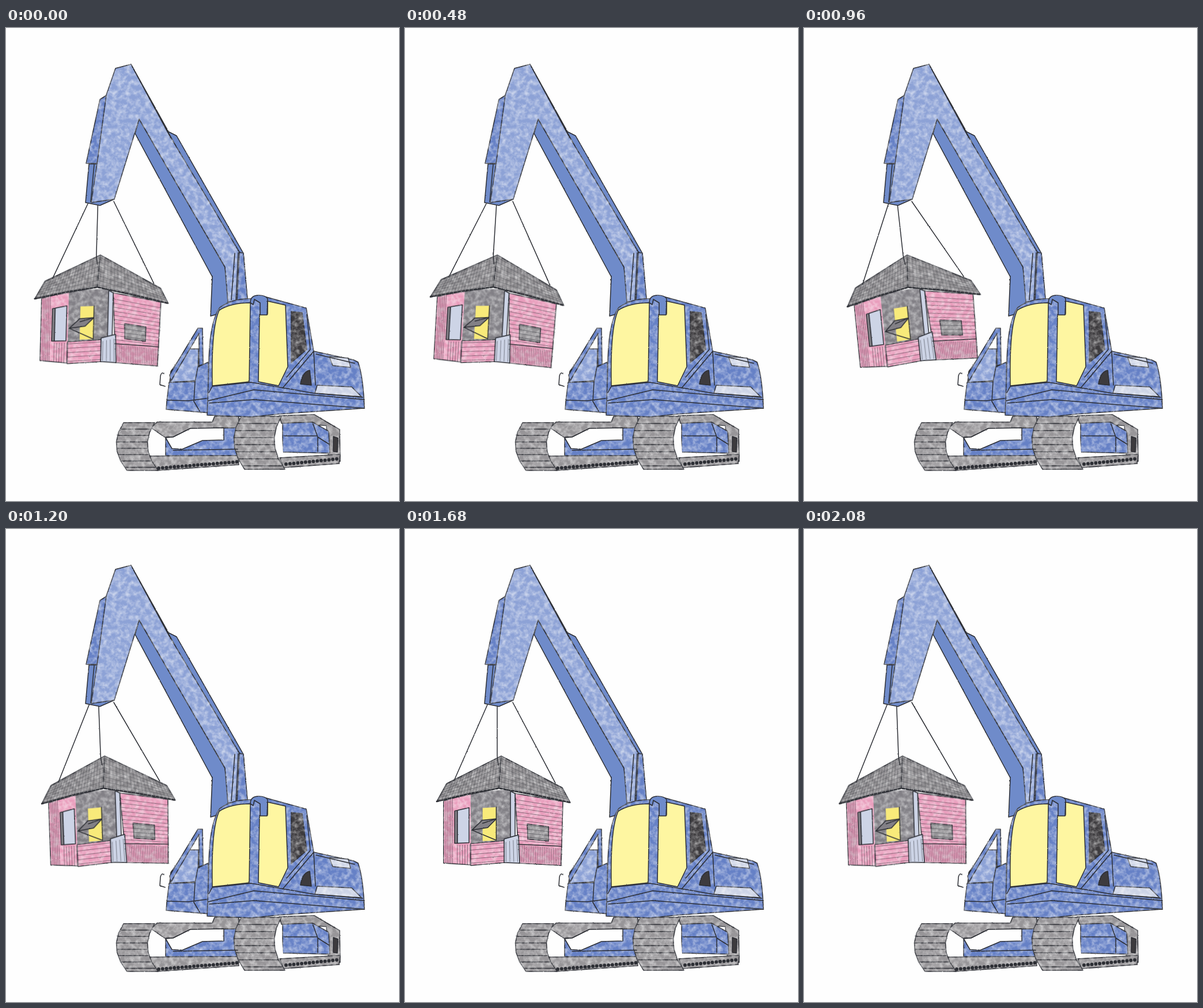
Write an HTML page that moves like this. It is 682x821 px and loops after 2.16 s.

```html
<!DOCTYPE html>
<html lang="en">
<head>
<meta charset="utf-8">
<title>Excavator carrying a house</title>
<style>
  html, body { margin: 0; width: 100%; height: 100%; overflow: hidden; background: #fefefe; }
  svg { display: block; width: 100%; height: 100%; }
  path { stroke: #2c2e34; stroke-width: 1.5; stroke-linejoin: round; stroke-linecap: round; }
  .line { fill: none; }
  .thin { fill: none; stroke-width: .8; stroke-opacity: .65; }
  .tile { fill: none; stroke-width: .8; stroke-opacity: .42; }
  .eave { fill: none; stroke-width: 2.4; stroke-dasharray: 4 3; }
  .dots { fill: none; stroke-width: 6; stroke-dasharray: 0 6.8; }
  .bare { stroke: none; }
  .light { fill: #8da2d6; }
  .blue { fill: #6681c6; }
  .deep { fill: #6f8bca; }
  .panel { fill: #cdd4e6; }
  .pane { fill: #fef6a1; }
  .lamp { fill: #f8ea7a; stroke: none; }
  .dark { fill: #3d3b3e; }
  .grey { fill: #979598; }
  .roof { fill: #908e91; }
  .porch { fill: #828086; }
  .pink { fill: #e99dbc; }
  .white { fill: #fefefe; }
  .crayon { filter: url(#crayon); }
  .pencil { filter: url(#pencil); }
</style>
</head>
<body>
<svg viewBox="0 0 682 821" preserveAspectRatio="none">
  <filter id="pencil" color-interpolation-filters="sRGB">
    <feTurbulence type="fractalNoise" baseFrequency=".5" numOctaves="2" seed="4"/>
    <feDisplacementMap in="SourceGraphic" scale="2" xChannelSelector="R" yChannelSelector="G"/>
  </filter>
  <filter id="crayon" color-interpolation-filters="sRGB">
    <feTurbulence type="fractalNoise" baseFrequency=".12" numOctaves="4" seed="7"/>
    <feColorMatrix values="0 0 0 0 1  0 0 0 0 1  0 0 0 0 1  1.1 0 0 0 -.4" result="chalk"/>
    <feTurbulence type="fractalNoise" baseFrequency=".5" numOctaves="2" seed="4"/>
    <feDisplacementMap in="SourceGraphic" scale="2" xChannelSelector="R" yChannelSelector="G" result="rough"/>
    <feComposite in="chalk" in2="rough" operator="in" result="grain"/>
    <feMerge><feMergeNode in="rough"/><feMergeNode in="grain"/></feMerge>
  </filter>
</svg>
<script>
  const svg = document.querySelector('svg');
  const mix = (a, b, t) => a + (b - a) * t;

  function add(parent, tag, className, d) {
    const node = document.createElementNS(svg.namespaceURI, tag);
    node.setAttribute('class', className);
    if (d) node.setAttribute('d', d);
    return parent.appendChild(node);
  }
  const layer = (filter, parent = svg) => add(parent, 'g', filter);

  // A face maps (u, v) in the unit square onto a quad given as "TL TR BR BL"
  function face(corners) {
    const [ax, ay, bx, by, cx, cy, dx, dy] = corners.split(' ').map(Number);
    return (u, v) => [mix(mix(ax, bx, u), mix(dx, cx, u), v), mix(mix(ay, by, u), mix(dy, cy, u), v)];
  }
  const line = (...points) => 'M' + points.join('L');
  const area = (at, u0 = 0, v0 = 0, u1 = 1, v1 = 1) =>
    line(at(u0, v0), at(u1, v0), at(u1, v1), at(u0, v1)) + 'Z';
  const repeat = (count, stroke) =>
    Array.from({ length: count }, (_, i) => stroke((i + .5) / count)).join('');
  const rows = (at, count, u0 = 0, v0 = 0, u1 = 1, v1 = 1) =>
    repeat(count, t => line(at(u0, mix(v0, v1, t)), at(u1, mix(v0, v1, t))));
  const columns = (at, count, u0 = 0, v0 = 0, u1 = 1, v1 = 1) =>
    repeat(count, t => line(at(mix(u0, u1, t), v0), at(mix(u0, u1, t), v1)));

  function drawHouse() {
    const house = add(svg, 'g', 'house');
    const side = face('67 472 115 458 115 583 67 580');
    const porch = face('114 456 188 452 188 540 114 545');
    const rail = face('114 546 172 541 173 579 114 584');
    const front = face('191 459 274 473 271 584 198 580');
    const post = face('183 455 191 459 191 533 183 535');
    const gate = face('172 538 197 531 199 580 172 579');
    const roofLeft = face('72 442 167 394 163 450 55 473');
    const roofRight = face('167 394 273 449 287 475 163 450');

    const fills = layer('crayon', house);
    add(fills, 'path', 'pink', area(side));
    add(fills, 'path', 'porch bare', area(porch));
    add(fills, 'path', 'pink', area(rail));
    add(fills, 'path', 'pink', area(front));
    add(fills, 'path', 'grey', area(front, .23, .42, .7, .64));
    add(fills, 'path', 'roof', area(roofLeft));
    add(fills, 'path', 'roof', area(roofRight));

    const details = layer('pencil', house);
    add(details, 'path', 'porch', area(side, .4, .2, .5, .69));
    add(details, 'path', 'panel', area(side, .5, .2, .92, .69));
    add(details, 'path', 'panel', area(post));
    add(details, 'path', 'panel', area(gate));
    add(details, 'path', 'lamp', area(porch, .28, .33, .61, .98));
    add(details, 'path', 'porch', line(porch(.03, .75), porch(.27, .57), porch(.6, .56), porch(.4, .72)) + 'Z');
    add(details, 'path', 'line', line(porch(.03, .75), porch(.6, .98), porch(.6, .33)) +
      line(porch(.28, .63), porch(.6, .56)) + line(front(0, .73), front(1, .7)));
    add(details, 'path', 'thin',
      rows(front, 11, 0, .06, 1, .7) + columns(front, 24, 0, .74, 1, .98) +
      columns(side, 5, .05, 0, .35, 1) + columns(side, 6, .45, .72, 1, 1) +
      rows(rail, 5) + columns(gate, 4, 0, .15, 1, .95));
    add(details, 'path', 'tile',
      rows(roofLeft, 7) + columns(roofLeft, 20) + rows(roofRight, 7) + columns(roofRight, 19));
    add(details, 'path', 'eave', line(roofLeft(0, 1), roofLeft(.5, .96), roofLeft(1, 1), roofRight(.5, .97), roofRight(1, 1)));
    return house;
  }

  function drawArm() {
    const back = layer('pencil');
    add(back, 'path', 'deep', 'M231 158L224 183 358 432 355 500 390 490 380 415Z');
    add(back, 'path', 'deep', 'M217 63L282 180 296 187 412 391 419 472 398 478 397 392Z');
    add(back, 'path', 'deep', 'M144 236L138 303 163 308 188 297 162 236Z');
    const front = layer('crayon');
    add(front, 'path', 'light', 'M190 70L217 63 283 185 405 389 401 475 385 475 380 415 231 158 188 297 148 303 158 235 173 119Z');
    add(front, 'path', 'blue', 'M163 124L174 117 158 235 139 235Z');
    add(front, 'path', 'blue', 'M405 389L412 391 419 470 401 474Z');
    add(layer('pencil'), 'path', 'line', 'M219 67L284 187M397 391L391 472M403 390L399 473M153 237L147 302');
  }

  function drawPlatform() {
    const fills = layer('crayon');
    add(fills, 'path', 'light', 'M284 615L286 596 314 557 334 557 333 612Z');
    add(fills, 'path', 'blue', 'M283 615L328 614 333 588 351 580 353 668 278 662 279 648Z');
    add(fills, 'path', 'blue', 'M284 602L333 521 341 521 342 584 335 586 335 530 286 613Z');
    add(layer('pencil'), 'path', 'line',
      'M280 646L316 647 348 643M328 614L326 648 336 665M276 622L267 619 268 604Q270 596 274 600');
  }

  // Curved belt end: its left rim bulges, and the right rim is the same curve moved by width
  function drawBelt(parent, x, top, bottom, width) {
    const rim = (u, v) => [x + u * width - 56 * v * (1 - v) + 6 * v * v, mix(top, bottom, v)];
    const edge = [0, .2, .4, .6, .8, 1];
    add(parent, 'path', 'grey', line(...edge.map(v => rim(0, v)), ...edge.reverse().map(v => rim(1, v))) + 'Z');
    add(parent, 'path', 'line', rows(rim, 7, .02, .07, .98, 1));
  }

  function drawTracks() {
    const fills = layer('crayon');
    add(fills, 'path', 'grey', 'M252 694L262 684 358 684 362 674 404 674 404 696 320 695 290 710 275 710Z');
    add(fills, 'path', 'blue', 'M277 711L290 710 320 695 402 694 402 743 277 742Z');
    add(fills, 'path', 'grey', 'M245 743L402 742 404 758 262 768Z');
    add(fills, 'path', 'grey', 'M474 673L535 671 579 697 580 752 560 754 556 690 478 686Z');
    add(fills, 'path', 'blue', 'M480 686L532 684 560 700 562 738 480 736Z');
    add(fills, 'path', 'grey', 'M475 746L580 740 578 756 482 763Z');
    drawBelt(fills, 204, 685, 768, 54);
    drawBelt(fills, 408, 674, 766, 70);
    const details = layer('pencil');
    add(details, 'path', 'white', 'M277 711L290 710 320 695 378 694 378 715 341 716 306 731 288 730Z');
    add(details, 'path', 'white bare', 'M471 692Q481 712 481 743L476 744Q463 718 471 692Z');
    add(details, 'path', 'dark', 'M568 709L576 712 575 736 568 735Z');
    add(details, 'path', 'line', 'M290 733L402 731M482 708H540M532 685L541 710 541 735M541 710L560 722');
    add(details, 'path', 'dots', 'M265 764L402 753M486 757L575 748');
  }

  function drawCab() {
    const fills = layer('crayon');
    add(fills, 'path', 'blue', 'M350 648L352 582Q353 510 371 485 394 469 424 470L448 466 521 486 534 561 603 576 611 580Q620 605 622 660L475 670 425 675 349 672Z');
    add(fills, 'path', 'panel', 'M561 570L594 573 598 589 567 586Z');
    add(fills, 'path', 'panel', 'M540 620L600 623 617 640 536 634Z');
    add(fills, 'path', 'dark', 'M495 492L514 494 522 558 495 581Z');
    const details = layer('pencil');
    add(details, 'path', 'pane', 'M358 621Q356 520 370 490 390 477 424 477L422 614Z');
    add(details, 'path', 'pane', 'M438 614L440 497 454 497 454 474 485 481 489 588 473 621Z');
    add(details, 'path', 'dark', 'M511 618Q514 597 527 594L530 620Z');
    add(details, 'path', 'deep', 'M424 477Q424 465 436 464 450 463 454 470L453 498 441 498 441 477 431 471 429 480Z');
    add(details, 'path', 'line', 'M534 561L480 625M522 497L528 558 487 606M534 562L537 620M538 566L605 582');
    add(details, 'path', 'line', 'M352 633L358 622 425 615 535 634 619 641M351 647L430 628 622 645M353 651L430 645 622 660');
  }

  const house = drawHouse();
  const ropes = add(svg, 'path', 'line pencil');
  drawArm();
  drawPlatform();
  drawTracks();
  drawCab();

  // The house swings in held poses; its ridge shifts against the tilt
  const HOLD = 240;
  const tilts = [1.5, 5.5, 3.2, 0, -5.7, -2, 2.8, 0, -1.9];
  const RIDGE = { x: 167, y: 394 };

  function showTilt(tilt) {
    const shift = -2.1 * tilt;
    const angle = tilt * Math.PI / 180, cos = Math.cos(angle), sin = Math.sin(angle);
    const hook = (dx, dy) => [RIDGE.x + shift + dx * cos - dy * sin, RIDGE.y + dx * sin + dy * cos];
    house.setAttribute('transform', `translate(${shift}) rotate(${tilt} ${RIDGE.x} ${RIDGE.y})`);
    ropes.setAttribute('d',
      line([143 + shift * .3, 305], hook(-82, 43)) +
      line([160 + shift * .2, 308], hook(-7, 0), hook(-5, 16)) +
      line([187, 301], hook(94, 47)));
  }

  let shown;
  function frame() {
    const pose = Math.floor(performance.now() / HOLD) % tilts.length;
    if (pose !== shown) showTilt(tilts[shown = pose]);
    requestAnimationFrame(frame);
  }
  frame();
</script>
</body>
</html>
```
